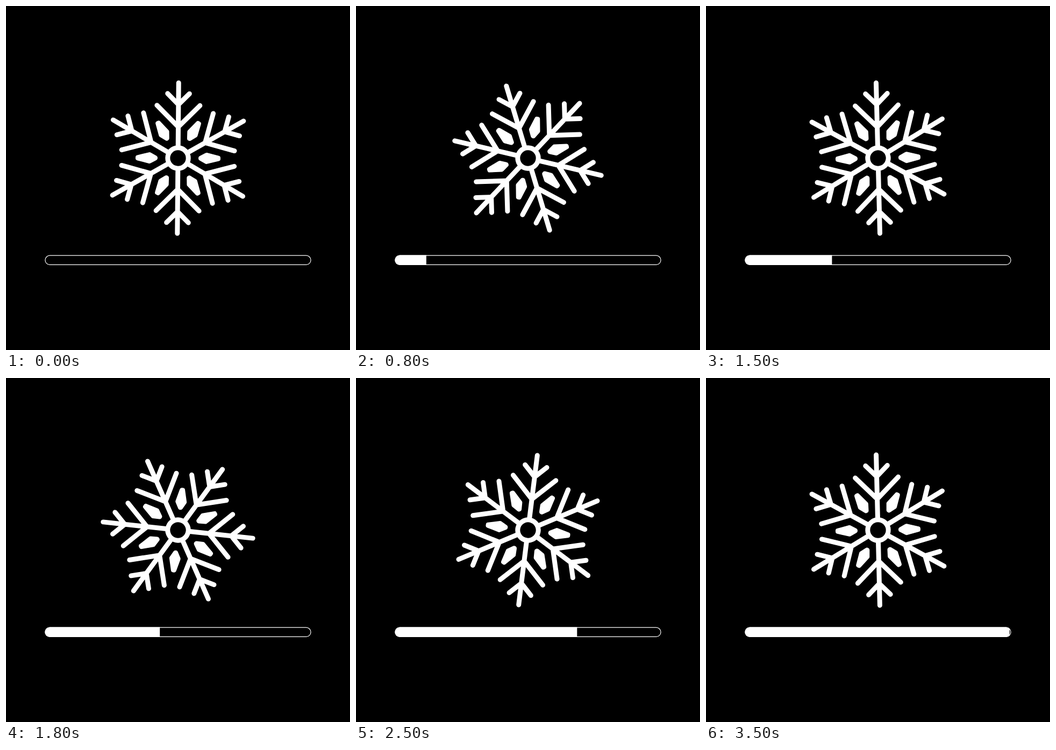
These frames come from a looping animation (640x640 px, 3600 ms). An HTML page:

```html
<!DOCTYPE html>
<html lang="en">
<head>
<meta charset="utf-8">
<title>Snowflake loader</title>
<style>
  html, body { margin: 0; width: 100%; height: 100%; overflow: hidden; background: #000; }
  svg { display: block; width: 100vw; height: 100vh; }
  .line { fill: none; stroke: #fff; stroke-width: 9; stroke-linecap: round; }
  .gem { fill: #fff; stroke: #fff; stroke-width: 8; stroke-linejoin: round; }
</style>
</head>
<body>
<svg viewBox="0 0 640 640">
  <defs>
    <g id="arm">
      <path class="line" d="M0-20V-140M-20.3-120L0-99.7L20.3-120M-40-98L0-58L40-98"/>
      <path class="gem" transform="rotate(30)" d="M-.5-42H.5L6.5-53L1-75H-1L-6.5-53Z"/>
    </g>
    <clipPath id="pill"><rect x="72.3" y="463.6" width="495.4" height="18.4" rx="9.2"/></clipPath>
  </defs>
  <g transform="translate(320 283)">
    <g id="flake"><circle class="line" r="19.2"/></g>
  </g>
  <rect x="72.9" y="464.2" width="494.2" height="17.2" rx="8.6" fill="none" stroke="#fff" stroke-width="1.2"/>
  <g clip-path="url(#pill)">
    <rect id="fill" x="71.2" y="463" width="0" height="20" fill="#fff"/>
  </g>
</svg>
<script>
  const LOOP = 3600, STEP = 100, BAR = 495.5;
  const flake = document.getElementById('flake');
  const fill = document.getElementById('fill');

  for (let i = 0; i < 6; i++) {
    const arm = document.createElementNS('http://www.w3.org/2000/svg', 'use');
    arm.setAttribute('href', '#arm');
    arm.setAttribute('transform', `rotate(${i * 60})`);
    flake.append(arm);
  }

  // One eased turn: [step, degrees]; the bar fills in proportion.
  const keys = [[0, 0.5], [6, 26.6], [8, 43.3], [12, 83.4], [18, 156.2],
                [25, 247.1], [29, 300], [30, 313.7], [35, 358.6]];
  const START_SLOPE = 1.35, END_SLOPE = 2.7;

  const rate = i => (keys[i + 1][1] - keys[i][1]) / (keys[i + 1][0] - keys[i][0]);

  function slope(i) {
    if (i === 0) return START_SLOPE;
    if (i === keys.length - 1) return END_SLOPE;
    const before = keys[i][0] - keys[i - 1][0];
    const after = keys[i + 1][0] - keys[i][0];
    return (rate(i - 1) * after + rate(i) * before) / (before + after);
  }

  // Smooth cubic through the keys
  function angleAt(n) {
    let i = 0;
    while (i < keys.length - 2 && n >= keys[i + 1][0]) i++;
    const [n0, a0] = keys[i], [n1, a1] = keys[i + 1];
    const h = n1 - n0, u = (n - n0) / h, v = 1 - u;
    return a0 * v * v * (1 + 2 * u) + a1 * u * u * (3 - 2 * u)
      + h * u * v * (slope(i) * v - slope(i + 1) * u);
  }

  function draw(ms) {
    const angle = angleAt(Math.floor((ms % LOOP) / STEP));
    flake.setAttribute('transform', `rotate(${angle.toFixed(3)})`);
    fill.setAttribute('width', (BAR * angle / 360).toFixed(2));
  }

  const start = performance.now();
  function tick() {
    draw(performance.now() - start);
    requestAnimationFrame(tick);
  }
  tick();
</script>
</body>
</html>
```
